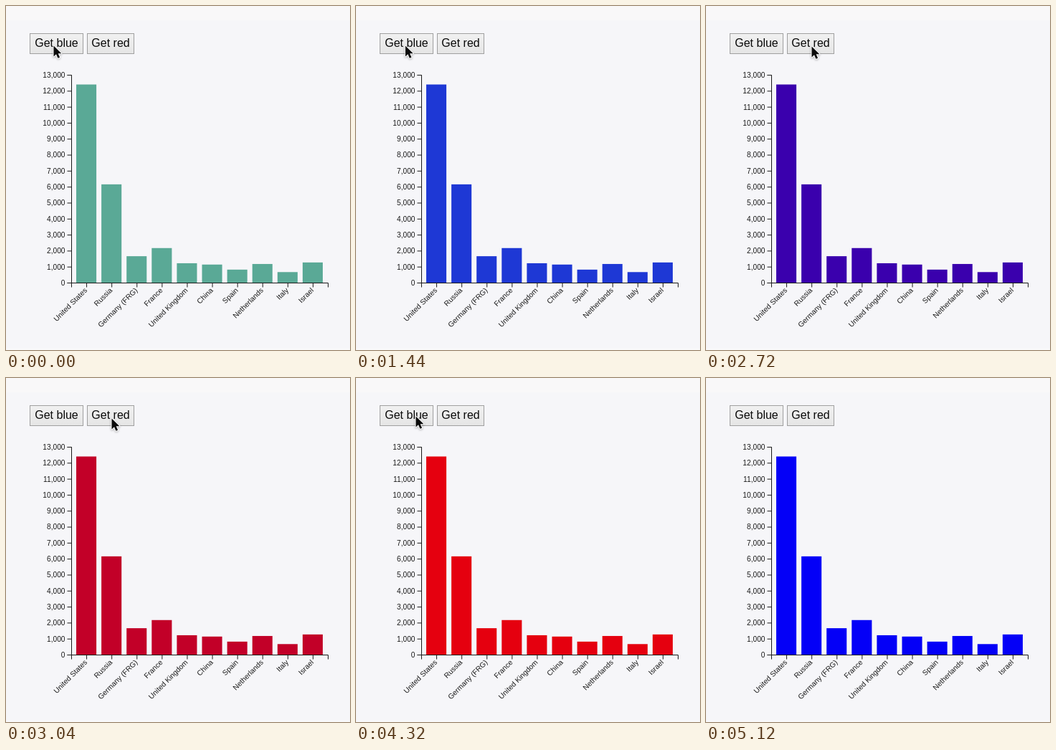
Animation, 480 px wide and 480 px high, one loop 5200 ms. Source, as an HTML page with a canvas:

```html
<!DOCTYPE html>
<html lang="en">
<head>
<meta charset="utf-8">
<title>Bar colour transition</title>
<style>
  html, body { margin: 0; width: 100%; height: 100%; overflow: hidden; background: #f6f6f9; }
  /* Slight softness, like a rescaled screen recording */
  canvas { display: block; width: 480px; height: 480px; filter: blur(0.4px); }
</style>
</head>
<body>
<canvas id="stage" width="480" height="480"></canvas>
<script>
const ctx = document.getElementById('stage').getContext('2d');
const LOOP = 5200;
const FADE = 1500;
const GAMMA = 1.17; // display profile: darkens the mid tones
const FONT = '"Liberation Sans", Arial, sans-serif';
const INK = '#1a1a1a';

const TEAL = [105, 179, 162], BLUE = [0, 0, 255], RED = [255, 0, 0];
const fades = [
  { start: 630, from: TEAL, to: BLUE },
  { start: 2100, from: BLUE, to: RED },
  { start: 3900, from: RED, to: BLUE }
];

const buttons = [
  { label: 'Get blue', x: 33, w: 75, presses: [[80, 600], [3740, 3900]] },
  { label: 'Get red', x: 113, w: 66, presses: [[1990, 2100]] }
];

// Cursor tip at given times
const path = [
  [0, 66.5, 55.5], [1400, 66.5, 55.5], [1800, 147.5, 56.5],
  [3180, 147.5, 56.5], [3600, 83.5, 53.5], [LOOP, 83.5, 53.5]
];
const CURSOR_END = 5040;

const data = [
  ['United States', 12394], ['Russia', 6148], ['Germany (FRG)', 1653],
  ['France', 2162], ['United Kingdom', 1214], ['China', 1131],
  ['Spain', 814], ['Netherlands', 1167], ['Italy', 660], ['Israel', 1263]
];
const LEFT = 91, BASE = 386, WIDTH = 358, HEIGHT = 290, MAX = 13000;
const STEP = WIDTH / (data.length + 0.2);
const BAND = STEP * 0.8;
const barX = i => LEFT + STEP * (0.2 + i);
const valueY = v => BASE - v / MAX * HEIGHT;

const clamp = u => Math.max(0, Math.min(1, u));
const mix = (a, b, u) => a + (b - a) * u;
const cubic = u => u < 0.5 ? 4 * u ** 3 : 1 - 4 * (1 - u) ** 3;
const smooth = u => u * u * (3 - 2 * u);
const toScreen = c => Math.round(255 * (c / 255) ** GAMMA);

function barColor(t) {
  const fade = fades.filter(f => t >= f.start).pop() || fades[0];
  const u = cubic(clamp((t - fade.start) / FADE));
  return `rgb(${fade.from.map((c, i) => toScreen(mix(c, fade.to[i], u)))})`;
}

function line(...points) {
  ctx.beginPath();
  points.forEach(([x, y]) => ctx.lineTo(x, y));
  ctx.stroke();
}

function text(str, x, y, size, align, color) {
  ctx.font = `${size}px ${FONT}`;
  ctx.textAlign = align;
  ctx.fillStyle = color;
  ctx.fillText(str, x, y);
}

function drawBackground() {
  ctx.fillStyle = '#f6f6f9';
  ctx.fillRect(0, 0, 480, 480);
  ctx.fillStyle = '#f9f8f9';
  ctx.fillRect(0, 0, 480, 20);
  ctx.fillStyle = '#fafafb';
  ctx.fillRect(0, 478, 480, 2);
}

function drawButton({ label, x, w, presses }, t) {
  const down = presses.some(([a, b]) => t >= a && t < b);
  const fill = ctx.createLinearGradient(0, 38, 0, 67);
  fill.addColorStop(0, down ? '#a8a8a8' : '#f1f1f1');
  fill.addColorStop(1, down ? '#b0b0b0' : '#e5e5e5');
  ctx.fillStyle = fill;
  ctx.fillRect(x, 38, w, 29);
  ctx.strokeStyle = '#a0a0a0';
  ctx.strokeRect(x + 0.5, 38.5, w - 1, 28);
  text(label, x + w / 2, 57, 16, 'center', down ? '#f6f6f6' : '#0a0a0a');
}

function drawBars(t) {
  ctx.fillStyle = barColor(t);
  data.forEach(([, v], i) => ctx.fillRect(barX(i), valueY(v), BAND, BASE - valueY(v)));
}

function drawAxes() {
  const x0 = LEFT + 0.5, y0 = BASE + 0.5, x1 = x0 + WIDTH;
  ctx.strokeStyle = INK;
  line([x0 - 6, y0 - HEIGHT], [x0, y0 - HEIGHT], [x0, y0], [x0 - 6, y0]);
  line([x0, y0 + 6], [x0, y0], [x1, y0], [x1, y0 + 6]);

  for (let v = 0; v <= MAX; v += 1000) {
    const y = valueY(v) + 0.5;
    line([x0 - 6, y], [x0, y]);
    text(v.toLocaleString('en-US'), x0 - 9, y + 3.4, 10.2, 'right', INK);
  }

  data.forEach(([name], i) => {
    const x = barX(i) + BAND / 2 + 0.5;
    line([x, y0], [x, y0 + 6]);
    ctx.save();
    ctx.translate(x - 10, BASE);
    ctx.rotate(-Math.PI / 4);
    text(name, 0, 16.1, 10.2, 'right', INK);
    ctx.restore();
  });
}

function cursorAt(t) {
  const i = path.findIndex(p => p[0] > t);
  const [ta, xa, ya] = path[i - 1], [tb, xb, yb] = path[i];
  const u = smooth((t - ta) / (tb - ta));
  return [mix(xa, xb, u), mix(ya, yb, u)];
}

const arrow = new Path2D('M0 0V15L3.5 11.8L5.9 17.3L8.6 16.2L6.2 10.7H10.9Z');

function drawCursor(t) {
  if (t >= CURSOR_END) return;
  ctx.save();
  ctx.translate(...cursorAt(t));
  ctx.lineJoin = 'round';
  ctx.lineWidth = 2;
  ctx.strokeStyle = '#fff';
  ctx.shadowColor = 'rgba(0, 0, 0, 0.3)';
  ctx.shadowBlur = 3;
  ctx.shadowOffsetY = 1;
  ctx.stroke(arrow);
  ctx.shadowColor = 'transparent';
  ctx.fillStyle = '#0a0a0a';
  ctx.fill(arrow);
  ctx.restore();
}

const begin = performance.now();

function draw() {
  const t = (performance.now() - begin) % LOOP;
  ctx.lineWidth = 1;
  drawBackground();
  buttons.forEach(b => drawButton(b, t));
  drawBars(t);
  drawAxes();
  drawCursor(t);
  requestAnimationFrame(draw);
}
draw();
</script>
</body>
</html>
```
